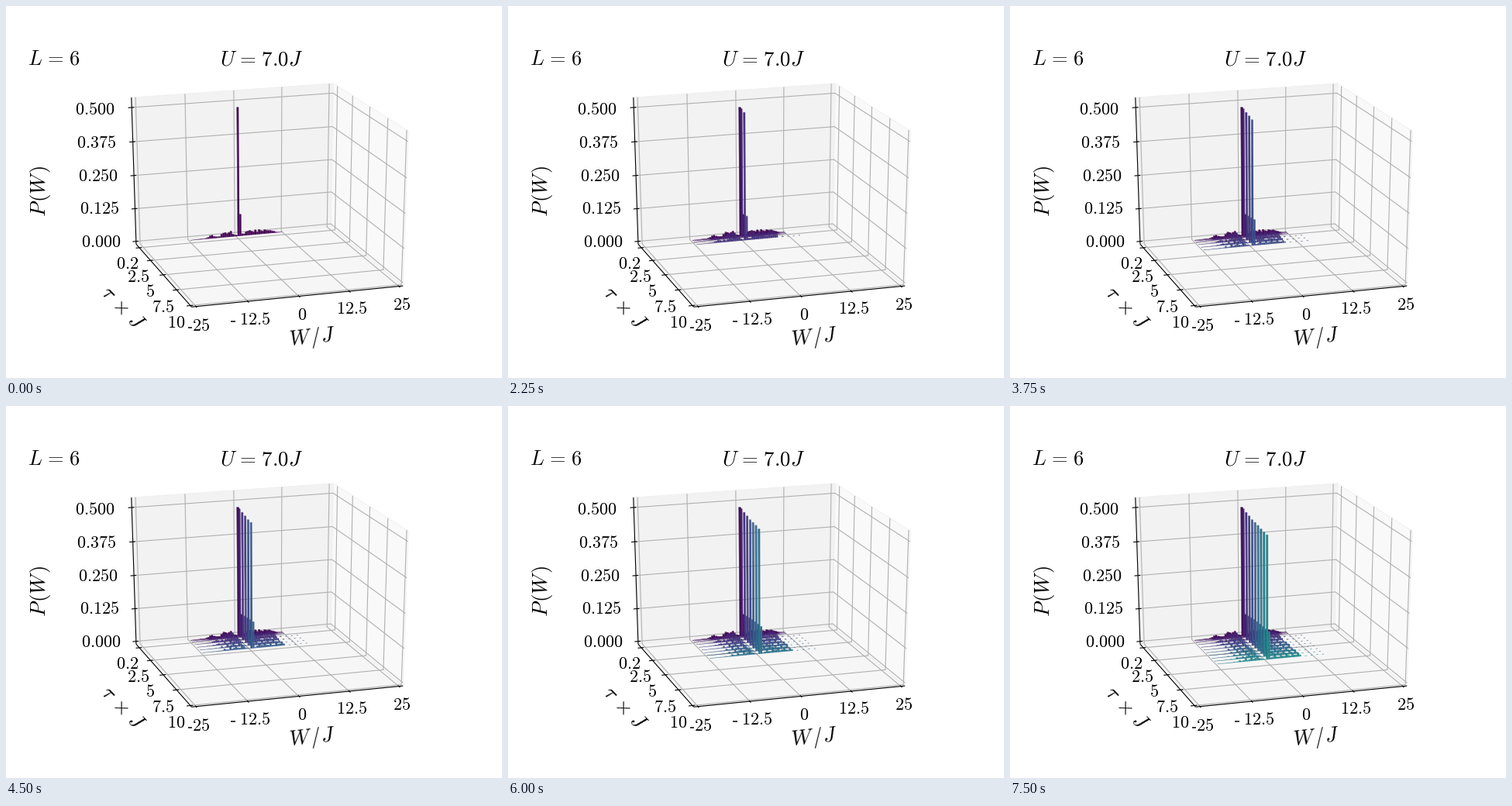
Write a matplotlib script that moves like this. It is 640 by 480 pixels and loops after 8000 ms.

```python
import matplotlib.pyplot as plt
import numpy as np
from matplotlib.animation import FuncAnimation
from matplotlib.collections import LineCollection, PolyCollection

plt.rcParams["mathtext.fontset"] = "cm"

WIDTH, HEIGHT, DPI = 640, 480, 100
EDGE = 0.5 + 1 / 48            # half size of the padded unit cube
ELEV, AZIM, DIST = np.radians(21), np.radians(-107.5), 10
CENTER = np.array([334.7, 238.0])
SCALE = np.array([268.1, -199.8])

# camera axes
RIGHT = np.array([-np.sin(AZIM), np.cos(AZIM), 0])
UP = np.array([-np.sin(ELEV) * np.cos(AZIM), -np.sin(ELEV) * np.sin(AZIM), np.cos(ELEV)])
VIEW = np.cross(RIGHT, UP)


def project(points):
    """Unit-cube coordinates to stage pixels."""
    p = np.asarray(points, float)
    depth = DIST - p @ VIEW
    flat = np.stack([p @ RIGHT, p @ UP], axis=-1)
    return CENTER + SCALE * flat * (DIST / depth)[..., None]


def ux(work):
    return work / 50


def uy(tau):
    return 0.5 - (tau + 0.25) / 10.25


def uz(prob):
    return prob / 0.525 - 0.5


fig = plt.figure(figsize=(WIDTH / DPI, HEIGHT / DPI), dpi=DPI, facecolor="white")
ax = fig.add_axes([0, 0, 1, 1])
ax.set_xlim(0, WIDTH)
ax.set_ylim(HEIGHT, 0)
ax.axis("off")

# ---- panes, grid, axes -------------------------------------------------
E = EDGE
X_TICKS = [-25, -12.5, 0, 12.5, 25]
Y_TICKS = [0.2, 2.5, 5, 7.5, 10]
Z_TICKS = [0, 0.125, 0.25, 0.375, 0.5]

panes = [
    ([(E, E, -E), (E, E, E), (E, -E, E), (E, -E, -E)], "#f9f9f9"),
    ([(-E, E, -E), (-E, E, E), (E, E, E), (E, E, -E)], "#f2f2f2"),
    ([(-E, -E, -E), (E, -E, -E), (E, E, -E), (-E, E, -E)], "#f6f6f6"),
]
ax.add_collection(PolyCollection([project(c) for c, _ in panes],
                                 facecolors=[c for _, c in panes],
                                 edgecolors="#efefef", linewidths=0.6, zorder=1))

grid = [[(ux(t), -E, -E), (ux(t), E, -E), (ux(t), E, E)] for t in X_TICKS]
grid += [[(-E, uy(t), -E), (E, uy(t), -E), (E, uy(t), E)] for t in Y_TICKS]
grid += [[(-E, E, uz(t)), (E, E, uz(t)), (E, -E, uz(t))] for t in Z_TICKS]
ax.add_collection(LineCollection([project(g) for g in grid],
                                 colors="#b0b0b0", linewidths=0.8, zorder=2))

spines = [
    [(-E, -E, -E), (E, -E, -E)],
    [(-E, E, -E), (-E, -E, -E)],
    [(-E, E, -E), (-E, E, E)],
]
IN, OUT = 0.012, 0.018
spines += [[(ux(t), -E - OUT, -E), (ux(t), -E + IN, -E)] for t in X_TICKS]
spines += [[(-E - OUT, uy(t), -E), (-E + IN, uy(t), -E)] for t in Y_TICKS]
spines += [[(-E - OUT, E, uz(t)), (-E + IN, E, uz(t))] for t in Z_TICKS]
ax.add_collection(LineCollection([project(s) for s in spines],
                                 colors="black", linewidths=0.8, zorder=3))


# ---- labels ------------------------------------------------------------
def label(x, y, tex, size=15.9, angle=0):
    ax.text(x, y, f"${tex}$", size=size, rotation=angle,
            ha="center", va="center", color="black", zorder=6)


def gap(em):
    return rf"\hspace{{{em}}}"


for i, text in enumerate(["0.500", "0.375", "0.250", "0.125", "0.000"]):
    label(114.6 + 2 * i, 134 + 42.8 * i, text)
for x, y, text in [(157, 333, "0.2"), (171, 350, "2.5"), (186, 369, "5"),
                   (203, 389, "7.5"), (220, 409, "10"),
                   (252, 413, "25"), (321, 405, "12.5"), (382, 399, "0"),
                   (446, 391, "12.5"), (511, 386, "25")]:
    label(x, y, text)
for x, y in [(234.5, 415), (290, 407)]:
    ax.plot([x, x + 5.5], [y, y], color="black", lw=1.1,
            solid_capstyle="butt", zorder=6)

EQUALS = gap(0.116) + "=" + gap(0.116)
label(61.7, 68.5, f"L{EQUALS}6", 19)
label(329.7, 69.5, f"U{EQUALS}7.0{gap(0.03)}J", 19.3)
label(44, 239, f"P{gap(0.08)}(W{gap(0.08)})", 19.3, 90)
label(395.5, 428, f"W{gap(0.1)}/{gap(0.03)}J", 19.3, 6)
label(151, 390, rf"\tau{gap(0.25)}\times{gap(0.12)}J", 19, -46)

# ---- distributions -----------------------------------------------------
TAUS = [0.2, 0.3] + [0.5 * k for k in range(1, 10)]
PEAKS = [0.485, 0.485, 0.484, 0.479, 0.474, 0.4685, 0.467, 0.4645, 0.460, 0.457, 0.456]
BIN, BAR_W, BAR_D = 0.5, 0.44, 0.07
PIXEL = 0.0029                 # probability per pixel of height

EARLY_W = [-12.5, -9, -8, -7, -6.3, -4.8, -4, -3.3, -2.4, -1.9, -1.2, -0.7,
           0.5, 1.5, 1.9, 2.8, 3.6, 4.4, 5, 5.4, 6.5, 7.5, 8.2, 9.5, 10.2, 12]
EARLY_H = [0, 0.6, 2, 5, 2.5, 2, 8, 6, 7.5, 7, 3.5, 1.5,
           2, 3, 5, 8, 5, 6, 4, 6.5, 4, 6.5, 4.5, 2.5, 0.4, 0]
LATE_W = [-11, -8, -7, -5, -2, -1, -0.5, 1, 2, 5, 8, 8.6, 9]
LATE_H = [0, 0.8, 2.5, 5, 8, 1, 0.5, 4, 7, 6, 5, 4, 0]

rng = np.random.default_rng(11)


def distribution(row):
    """Bin centres and probabilities of one row, from right to left."""
    tau = TAUS[row]
    mix = np.clip((tau - 0.5) / 1.5, 0, 1)
    work = np.arange(14.5, -12.6, -BIN)
    early = np.interp(work, EARLY_W, EARLY_H)
    comb = 0.62 + 0.38 * np.cos(2 * np.pi * (work - 2) / (3 * BIN))
    late = np.interp(work, LATE_W, LATE_H) * comb
    prob = PIXEL * ((1 - mix) * early + mix * late)
    prob *= rng.uniform(0.6, 1.1, work.size)
    prob[work == 0] = PEAKS[row]
    prob[work == BIN] = 0.08 + 0.025 * (1 - np.exp(-tau / 1.5))
    if row < 3:
        keep = work < 12
    else:
        keep = (work < 9) | (np.round(work / BIN) % 3 == 2)
    return work[keep], prob[keep]


def bar(work, tau, prob):
    """Top, left and front faces of one bar."""
    x0, x1 = ux(work - BAR_W / 2), ux(work + BAR_W / 2)
    back, front = uy(tau - BAR_D / 2), uy(tau + BAR_D / 2)
    z0, z1 = uz(0), uz(prob)
    return [
        [(x0, back, z1), (x1, back, z1), (x1, front, z1), (x0, front, z1)],
        [(x0, back, z0), (x0, back, z1), (x0, front, z1), (x0, front, z0)],
        [(x0, front, z0), (x0, front, z1), (x1, front, z1), (x1, front, z0)],
    ]


SHADES = (0.85, 0.72, 1.0)
faces, colors, counts = [], [], []
for row, tau in enumerate(TAUS):
    base = np.array(plt.cm.viridis(row / 21)[:3])
    for w, p in zip(*distribution(row)):
        faces += bar(w, tau, p)
        colors += [base * s for s in SHADES]
    counts.append(len(faces))
faces = project(faces)
colors = np.array(colors)

bars = PolyCollection([], linewidths=0, zorder=4)
ax.add_collection(bars, autolim=False)


def update(frame):
    n = counts[min(frame // 3, len(counts) - 1)]
    bars.set_verts(faces[:n])
    bars.set_facecolor(colors[:n])
    return (bars,)


anim = FuncAnimation(fig, update, frames=32, interval=250, repeat=True,
                     repeat_delay=0, blit=False)
plt.show()
```
